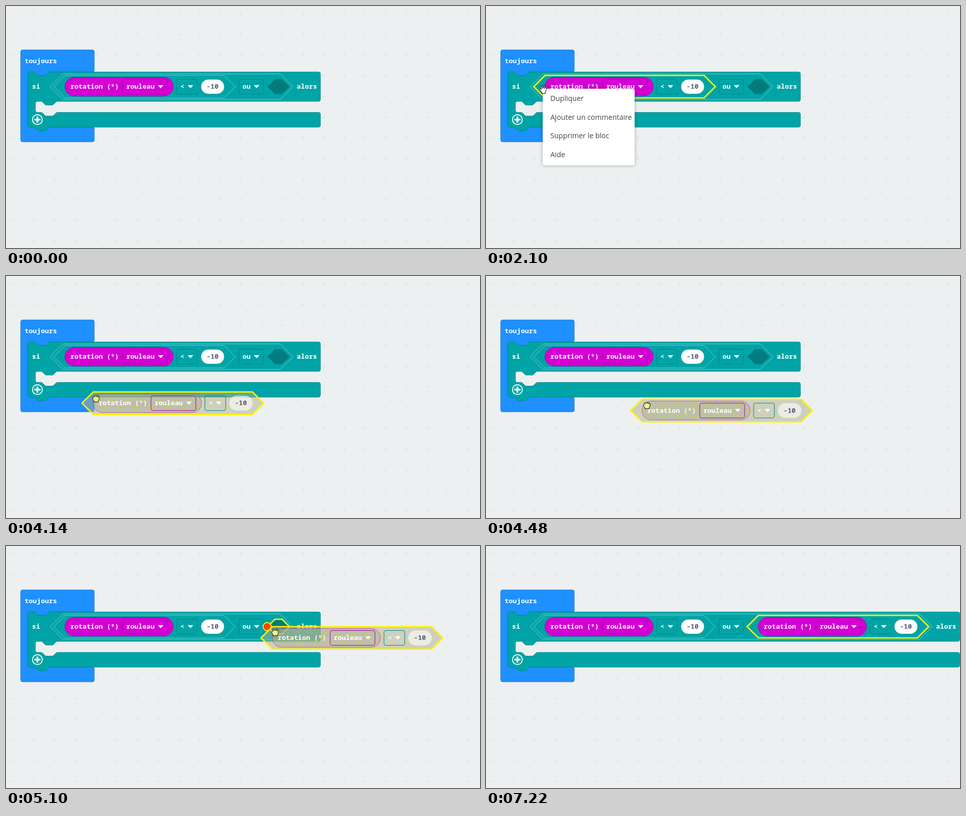
Animation, 928 px wide and 474 px high, one loop 8 s. Source, as an HTML page:

```html
<!DOCTYPE html>
<html lang="fr">
<head>
<meta charset="utf-8">
<title>Blocs</title>
<style>
  html, body { margin: 0; width: 100%; height: 100%; overflow: hidden; background: #ecf0f1; }
  svg { display: block; width: 928px; height: 474px; }
  text { font: 700 13.2px "Noto Sans Mono", "DejaVu Sans Mono", monospace; fill: #fff; white-space: pre; }
  .menu text { font: 400 14px "Open Sans", "Noto Sans", sans-serif; fill: #444; }
  .num { fill: #575e75; }
</style>
</head>
<body>
<svg id="stage" viewBox="0 0 928 474">
  <defs>
    <pattern id="grid" width="40.5" height="40.5" x="-5.75" y="-5.25" patternUnits="userSpaceOnUse">
      <path d="M17.2 20.25h6.1M20.25 17.2v6.1" stroke="#dde1e2"/>
    </pattern>
    <pattern id="hatch" width="9" height="9" patternUnits="userSpaceOnUse">
      <rect width="9" height="9" fill="#aaa"/>
      <path d="M0 0L9 9M9 0L0 9" stroke="#cc0" stroke-width=".9"/>
    </pattern>
    <filter id="shade" x="-10%" y="-10%" width="120%" height="120%">
      <feDropShadow dx="0" dy="0" stdDeviation="3.5" flood-opacity=".3"/>
    </filter>
  </defs>
  <rect width="928" height="474" fill="url(#grid)"/>
</svg>
<script>
const LOOP = 8000, STEP = 70;
const TEAL = '#00a4a6', TEAL_EDGE = '#008385', RIM = '#7dcfd0';
const PINK = '#d400d4', PINK_EDGE = '#a800a8', YELLOW = '#fff200';
const stage = document.getElementById('stage');

function add(parent, tag, attrs = {}, text) {
  const el = document.createElementNS('http://www.w3.org/2000/svg', tag);
  set(el, attrs);
  if (text) el.textContent = text;
  parent.append(el);
  return el;
}
function set(el, attrs) {
  for (const k in attrs) el.setAttribute(k, attrs[k]);
}
const show = (el, on) => set(el, { visibility: on ? 'visible' : 'hidden' });
const move = (el, x, y) => set(el, { transform: `translate(${x} ${y})` });
const label = (g, x, y, s, cls = '') => add(g, 'text', { x, y, class: cls }, s);

// Hexagon from tip to tip around the row centre
function hex(left, right, half, y = 158) {
  return `M${left} ${y}l${half} ${-half}H${right - half}l${half} ${half}l${-half} ${half}H${left + half}z`;
}
function field(g, x, w, edge) {
  add(g, 'rect', { x, y: 143.5, width: w, height: 29, rx: 3.6, fill: 'none', stroke: edge });
  const ax = x + w - 18.2;
  add(g, 'path', {
    d: `M${ax} 155.5h9.4l-4.7 5z`, fill: '#fff', stroke: '#fff', 'stroke-linejoin': 'round'
  });
}

// Block outlines, in units of 0.9 px
const notch = 'c2 0 3 1 4 2l4 4c1 1 2 2 4 2h12c2 0 3-1 4-2l4-4c1-1 2-2 4-2';
const notchBack = 'c-2 0-3 1-4 2l-4 4c-1 1-2 2-4 2h-12c-2 0-3-1-4-2l-4-4c-1-1-2-2-4-2';
const turn = (x, y, sweep = 1) => `a4 4 0 0 ${sweep} ${x} ${y}`;
function mouth(w, top, gap, head, foot) {
  return 'M0 4' + turn(4, -4) + head + `H${w - 4}` + turn(4, 4) + `v${top - 8}` + turn(-4, 4) +
    'H64' + notchBack + 'h-8' + turn(-4, 4, 0) + `v${gap - 8}` + turn(4, 4, 0) + 'h8' + notch +
    `H${w - 4}` + turn(4, 4) + 'v24' + turn(-4, 4) + foot + 'H4' + turn(-4, -4) + 'z';
}
const ifShape = w => mouth(w, 64, 24, 'h8' + notch, 'H48' + notchBack);

function comparison(parent) {
  const g = add(parent, 'g');
  const body = add(g, 'path', { d: hex(93.5, 449, 22), 'stroke-linejoin': 'miter' });
  const pill = add(g, 'rect', { x: 115.3, y: 139.5, width: 212, height: 36.8, rx: 18.4, stroke: PINK_EDGE });
  label(g, 126, 162, 'rotation (º)');
  field(g, 228.5, 87.8, PINK_EDGE);
  label(g, 235.5, 162, 'rouleau');
  field(g, 334, 40.6, TEAL_EDGE);
  label(g, 341.3, 162, '<');
  const value = add(g, 'rect', { x: 381.5, y: 143.5, width: 46, height: 29, rx: 14.5, fill: '#fff', stroke: TEAL_EDGE, 'stroke-width': .8 });
  label(g, 392.5, 162, '-10', 'num');
  return {
    g,
    style(selected, off) {
      const alpha = off ? .5 : 1;
      set(body, {
        fill: off ? 'url(#hatch)' : TEAL, 'fill-opacity': alpha,
        stroke: selected ? YELLOW : RIM, 'stroke-width': selected ? 2.7 : .9
      });
      set(pill, { fill: off ? 'url(#hatch)' : PINK, 'fill-opacity': alpha, 'stroke-opacity': alpha });
      set(value, { 'fill-opacity': off ? .6 : 1, 'stroke-opacity': off ? 0 : 1 });
    }
  };
}

// Program
add(stage, 'path', {
  d: mouth(160, 48, 120, '', ''), transform: 'translate(28.8 86) scale(.9)',
  fill: '#1e90ff', stroke: '#1873cc'
});
label(stage, 36.5, 112, 'toujours');
const ifBlock = add(stage, 'path', {
  transform: 'translate(43.2 129.2) scale(.9)', fill: TEAL, stroke: TEAL_EDGE
});
label(stage, 51, 162, 'si');
const plus = add(stage, 'g', { stroke: '#fff', fill: 'none', transform: 'translate(61.5 222.5)' });
add(plus, 'circle', { r: 9.6, 'stroke-width': 1.8 });
add(plus, 'path', { d: 'M-6 0H6M0-6V6', 'stroke-width': 3.6 });
const orRim = add(stage, 'path', { fill: TEAL, stroke: RIM, 'stroke-width': .9 });
field(stage, 456, 48.2, TEAL_EDGE);
label(stage, 463, 162, 'ou');
const slot = add(stage, 'path', { d: hex(512, 555, 14.5), fill: '#007c7e' });
const alors = label(stage, 569.3, 162, 'alors');
const first = comparison(stage);
const target = add(stage, 'g');
add(target, 'path', { d: hex(512, 555, 14.5), fill: '#007c7e', stroke: YELLOW, 'stroke-width': 2.7 });
add(target, 'circle', { cx: 511.3, cy: 158, r: 8, fill: '#ff4500', stroke: YELLOW, 'stroke-width': 1.8 });
const copy = comparison(stage);

// Context menu
const menu = add(stage, 'g', { class: 'menu' });
add(menu, 'rect', { x: 111, y: 162, width: 180, height: 150, rx: 4, fill: '#fff', filter: 'url(#shade)' });
const items = ['Dupliquer', 'Ajouter un commentaire', 'Supprimer le bloc', 'Aide']
  .map((s, i) => label(menu, 126, 186 + i * 36.5, s));

// Pointer
const pointer = add(stage, 'g', { stroke: '#000', 'stroke-linejoin': 'round', 'stroke-linecap': 'round' });
const openHand = add(pointer, 'path', {
  fill: '#fff',
  d: 'M-2.5 8V6.5C-4 4.5-6 2-7.5.2C-8-1-6.5-2-5.3-1L-3.8.6L-5.3-4.5C-5.6-6.2-3.6-6.6-3-5L-1.8-1.5L-1.9-6.8' +
    'C-1.9-8.5.3-8.5.4-6.8L.6-1.8L1.7-6.2C2.1-7.7 4-7.3 3.7-5.6L3-1.2L4.7-3.7C5.6-5 7.3-4 6.7-2.6' +
    'C5.8-.5 6 1.5 5 3.8L4.2 6V8z'
});
const fist = add(pointer, 'path', {
  fill: '#f5f08c',
  d: 'M-4 6.5V5C-6 2.5-7.5.5-6.5-1L-5-1.5L-5.2-3.5C-5-5-3-5.2-2.3-4.3C-1.8-6 .8-6 1-4.7C1.8-5.8 4-5.3 4-3.8' +
    'C5.5-4.5 6.8-3.3 6.5-1.8C6.5 1 5.5 3 4.5 5V6.5zM-2.3-4.3v1.6M1-4.7v1.8M4-3.8v1.5'
});

// [ms, x, y]
const pointerPath = [
  [200, 432, 439], [540, 270, 299], [960, 118, 167], [1170, 112, 163], [2430, 112, 163], [2640, 134, 174],
  [2970, 134, 174], [3250, 178, 328], [3670, 165, 240], [3810, 163.5, 236], [3940, 163.5, 236],
  [4200, 187, 243], [4340, 235, 255], [4480, 315, 253], [4760, 517, 174], [4900, 534, 168],
  [5100, 527, 169], [5900, 527, 169], [6320, 580, 268], [6520, 580, 268], [7220, 580, 492]
];
const copyPath = [
  [2900, 43, 86.5], [3940, 43, 86.5], [4200, 66, 95], [4340, 112, 108], [4480, 190, 105.5],
  [4760, 396, 27], [4900, 413, 22], [5100, 406, 22]
];

function at(path, t) {
  const i = path.findIndex(k => k[0] > t);
  if (i < 0) return path[path.length - 1].slice(1);
  if (i === 0) return path[0].slice(1);
  const [a, x0, y0] = path[i - 1], [b, x1, y1] = path[i];
  const p = Math.floor((t - a) / STEP + .001) * STEP / (b - a);
  return [x0 + (x1 - x0) * p, y0 + (y1 - y0) * p];
}

function draw(t) {
  const dropped = t >= 5700, grow = dropped ? 311.7 : 0;
  set(ifBlock, { d: ifShape(636 + grow / .9) });
  set(orRim, { d: hex(86.5, 562 + grow, 25) });
  set(alors, { x: 569.3 + grow });
  show(slot, !dropped);
  show(target, t >= 4690 && !dropped);

  first.style(t >= 1430 && t < 2900, false);
  copy.style(true, t < 5970);
  show(copy.g, t >= 2900);
  move(copy.g, ...(dropped ? [417.7, 0] : at(copyPath, t)));

  show(menu, t >= 2030 && t < 2900);
  items[0].style.fill = t >= 2570 ? '#000' : '';

  const held = t >= 3810 && !dropped, seen = t >= 200 && t < 7220;
  show(openHand, seen && !held);
  show(fist, seen && held);
  move(pointer, ...at(pointerPath, t));
}

function frame() {
  draw(performance.now() % LOOP);
  requestAnimationFrame(frame);
}
frame();
</script>
</body>
</html>
```
